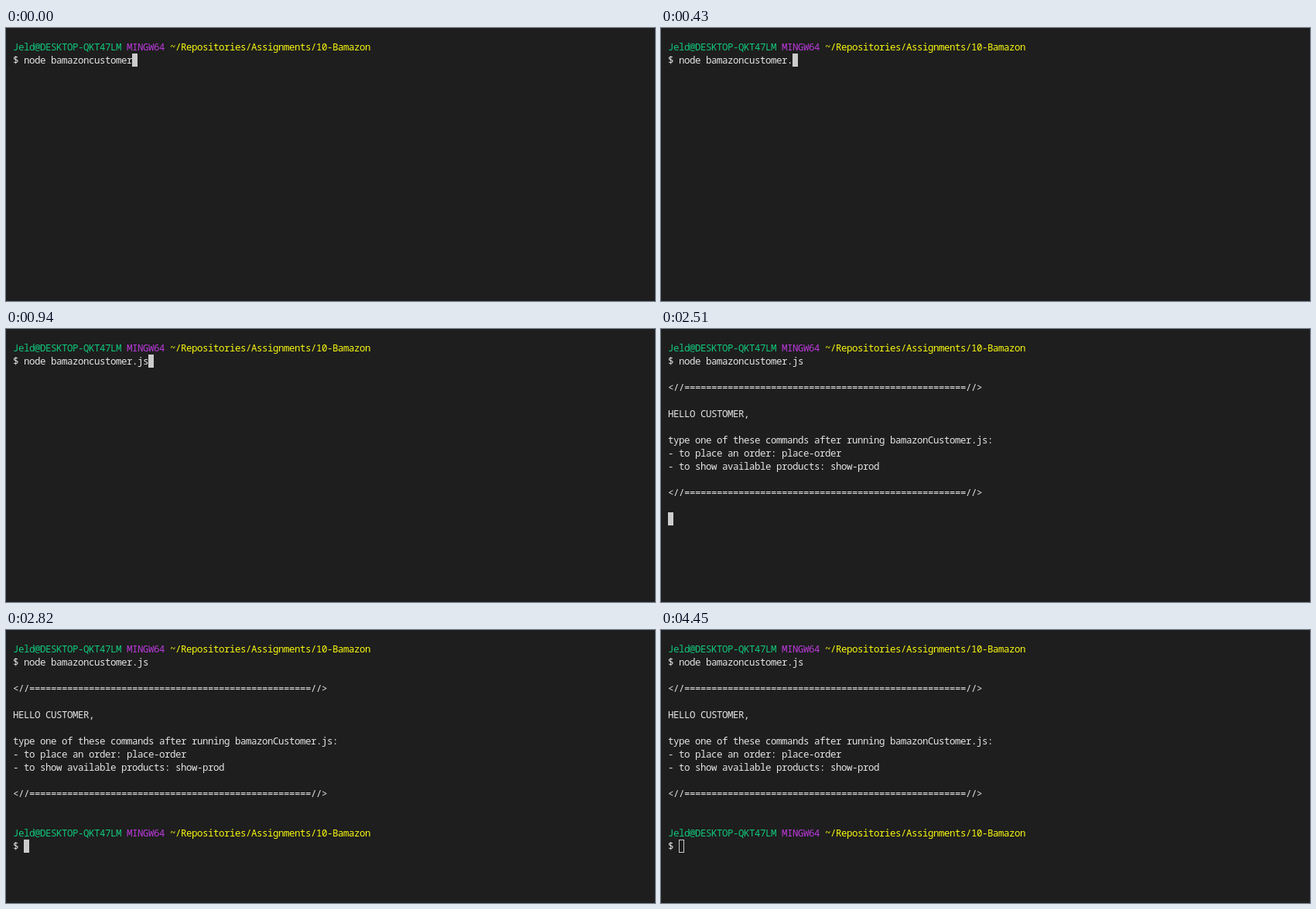
Recreate the animation shown at these times as an HTML page. Size 839 by 353 pixels, loop 4.58 s.

```html
<!DOCTYPE html>
<html lang="en">
<head>
<meta charset="utf-8">
<title>Terminal session</title>
<style>
  :root { --loop: 4580ms step-end infinite; }
  html, body { margin: 0; width: 100%; height: 100%; overflow: hidden; background: #1e1e1e; }

  /* A cell is 7 by 17 px; the text starts at 9,16. */
  pre {
    position: absolute; left: 9px; top: 16px; margin: 0;
    font: 500 12.5px/17px "Noto Sans Mono", "DejaVu Sans Mono", monospace;
    letter-spacing: calc(7px - 1ch);
    font-variant-ligatures: none;
    color: #e5e5e5;
  }
  .host { color: #10c87c; }
  .shell { color: #bc3adc; }
  .path { color: #f8f810; }

  .typed { display: inline-block; animation: type var(--loop); }
  .output { animation: output var(--loop); }
  .prompt { animation: prompt var(--loop); }
  .cursor {
    position: absolute; left: 0; top: 0; width: 7px; height: 17px;
    box-sizing: border-box; border: 1px solid #ccc; background: #ccc;
    animation: move var(--loop), blur var(--loop);
  }

  @keyframes type {
    0% { clip-path: inset(0 21px 0 0); }
    9.388% { clip-path: inset(0 14px 0 0); }
    19.213% { clip-path: inset(0 7px 0 0); }
    20.524%, 100% { clip-path: inset(0); }
  }
  @keyframes output {
    0% { visibility: hidden; }
    54.803%, 100% { visibility: visible; }
  }
  @keyframes prompt {
    0% { visibility: hidden; }
    61.572%, 100% { visibility: visible; }
  }
  @keyframes move {
    0% { transform: translate(154px, 17px); }
    9.388% { transform: translate(161px, 17px); }
    19.213% { transform: translate(168px, 17px); }
    20.524% { transform: translate(175px, 17px); }
    33.624% { transform: translate(0, 34px); }
    54.803% { transform: translate(0, 221px); }
    61.572%, 100% { transform: translate(14px, 255px); }
  }
  @keyframes blur {
    0% { background: #ccc; }
    97.161%, 100% { background: transparent; }
  }
</style>
</head>
<body>
<pre><span class="host">Jeld@DESKTOP-QKT47LM</span> <span class="shell">MINGW64</span> <span class="path">~/Repositories/Assignments/10-Bamazon</span>
$ node bamazoncustomer<span class="typed">.js</span>
<span class="output">
&lt;//====================================================//&gt;

HELLO CUSTOMER,

type one of these commands after running bamazonCustomer.js:
- to place an order: place-order
- to show available products: show-prod

&lt;//====================================================//&gt;
</span>

<span class="prompt"><span class="host">Jeld@DESKTOP-QKT47LM</span> <span class="shell">MINGW64</span> <span class="path">~/Repositories/Assignments/10-Bamazon</span>
$ </span><i class="cursor"></i></pre>
</body>
</html>
```
